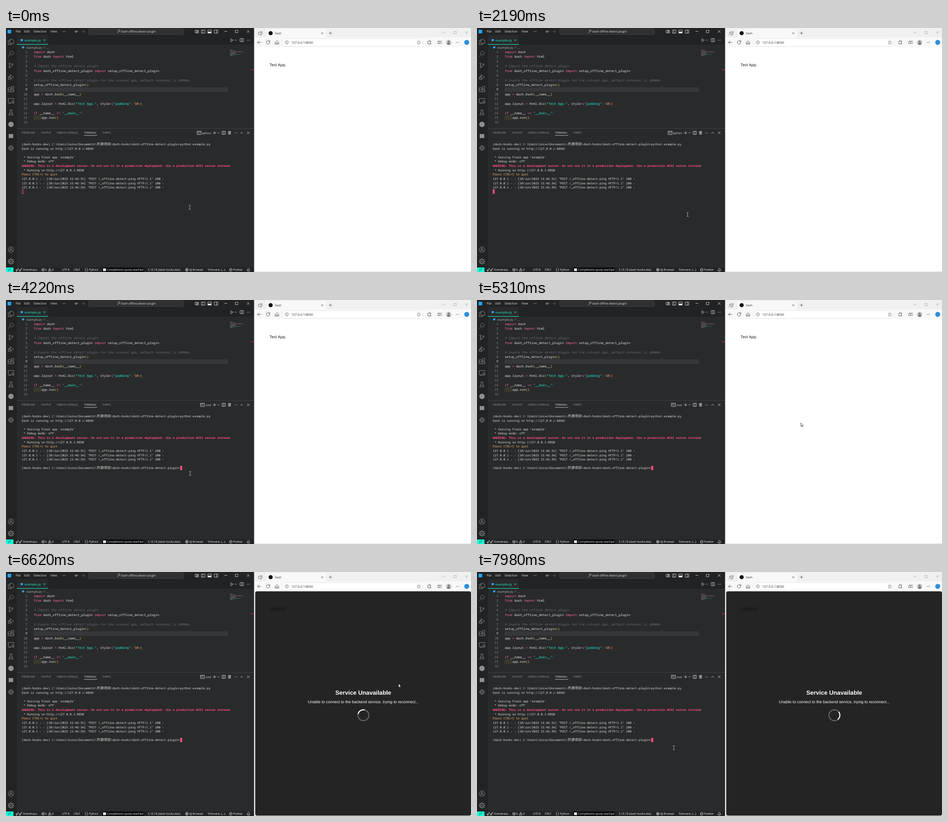
Write an HTML page that moves like this. It is 1030 by 543 pixels and loops after 8 s.

```html
<!DOCTYPE html>
<html lang="en">
<head>
<meta charset="utf-8">
<title>Offline detect demo</title>
<style>
html, body { margin: 0; width: 100%; height: 100%; overflow: hidden; background: #292a2b; }
svg { display: block; width: 1030px; height: 543px; }
text { white-space: pre; text-rendering: geometricPrecision; font-family: "Open Sans", "Noto Sans", sans-serif; }
.mono { font-family: "Noto Sans Mono", "Noto Sans CJK SC", "Noto Sans CJK", monospace; font-weight: 500; }
.mono.bold { font-weight: 700; }
.arial { font-family: "Liberation Sans", Arial, sans-serif; }
</style>
</head>
<body>
<svg id="stage" viewBox="0 0 1030 543" xmlns="http://www.w3.org/2000/svg"></svg>
<script>
const NS = 'http://www.w3.org/2000/svg';
const stage = document.getElementById('stage');
const LIGHT = '#e6e6e6', DIM = '#8d8f92', PINK = '#ff4b82', CYAN = '#19f9d8', BLUE = '#2f9be0';
const INK = '#333';

function el(tag, attrs, parent = stage, text) {
  const n = document.createElementNS(NS, tag);
  for (const k in attrs) n.setAttribute(k, attrs[k]);
  if (text !== undefined) n.textContent = text;
  return parent.appendChild(n);
}
const group = (parent = stage) => el('g', {}, parent);
const rect = (x, y, width, height, fill, more = {}, parent = stage) =>
  el('rect', { x, y, width, height, fill, ...more }, parent);
const dot = (cx, cy, r, fill, parent = stage) => el('circle', { cx, cy, r, fill }, parent);
const label = (x, y, str, size, fill = LIGHT, more = {}, parent = stage) =>
  el('text', { x, y, 'font-size': size, fill, ...more }, parent, str);
const icon = (d, x, y, stroke = LIGHT, width = 0.8, parent = stage) =>
  el('path', { d, transform: `translate(${x} ${y})`, fill: 'none', stroke,
    'stroke-width': width, 'stroke-linejoin': 'round', 'stroke-linecap': 'round' }, parent);
const ring = r => `M${-r} 0a${r} ${r} 0 1 1 ${2 * r} 0a${r} ${r} 0 1 1 ${-2 * r} 0`;
const box = (w, h) => `M${-w / 2} ${-h / 2}h${w}v${h}h${-w}z`;
const cross = r => `M${-r} ${-r}L${r} ${r}M${r} ${-r}L${-r} ${r}`;
const dots = (x, y, fill) => [-2.7, 0, 2.7].forEach(d => dot(x + d, y, 0.65, fill));
const globe = r => ring(r) + `M${-r} 0H${r}M0 ${-r}Q${r} 0 0 ${r}Q${-r} 0 0 ${-r}`;
const CHEVRON = 'M-1.8-.8L0 1L1.8-.8';
const SEARCH = 'M-1-1.6a2.1 2.1 0 1 1 0 .01M-.6 1L-3 3.2';

function drawTitleBar() {
  rect(0, 0, 549, 16, '#222324');
  rect(3.5, 4, 8, 8, '#22a7f2');
  [[21.5, 'File'], [40.5, 'Edit'], [61, 'Selection'], [98.5, 'View']]
    .forEach(([x, s]) => label(x, 10.4, s, 6.8));
  dots(128.5, 8, LIGHT);
  icon('M3.3 0H-3.3M-.6-2.8L-3.4 0L-.6 2.8', 156.5, 8);
  icon('M-3.3 0H3.3M.6-2.8L3.4 0L.6 2.8', 171, 8, '#777');
  rect(183, 1.5, 210, 13, '#2f3031', { rx: 3, stroke: '#505152', 'stroke-width': 0.6 });
  icon(SEARCH, 249.5, 7.6);
  label(255, 10.4, 'dash-offline-detect-plugin', 6.42);
  icon('M-3.5-3h3v6h-3zM1-3h2.5v2.2H1zM1 .8h2.5V3H1z', 423, 8);
  icon(box(7.4, 7) + 'M-1-3.5v7', 437, 8);
  icon(box(7.4, 7), 451, 8);
  rect(447.3, 8, 7.4, 3.5, LIGHT);
  icon(box(7.4, 7) + 'M1-3.5v7', 465.5, 8);
  icon('M-2.8 0H2.8', 487, 7.6);
  icon(box(5.4, 5.4), 511, 7.8);
  icon(cross(2.6), 536.5, 7.8);
}

function drawActivityBar() {
  rect(0, 16, 24, 517, '#222324');
  [
    ['M-2-6h5l3 3v6.5h-8zM-2-3h-4v9h7.5V3.5', 31],
    ['M-2.6-1.4a4 4 0 1 1 0 .01M-1.5 1.8L-6 6.3', 57],
    ['M-1.3-3.6a1.7 1.7 0 1 1-3.4 0a1.7 1.7 0 1 1 3.4 0M-3-1.9v4.4M-1.3 4.2a1.7 1.7 0 1 1-3.4 0a1.7 1.7 0 1 1 3.4 0M5-2a1.7 1.7 0 1 1-3.4 0A1.7 1.7 0 1 1 5-2M3.3-.2Q3 2-1.3 3', 83],
    ['M-2-5.5L6 0L-1 4.5M-2-5.5v4M-5-.5h4v4a2 2 0 0 1-4 0zM-6.3 1h1.3M-6.3 4h1.4M-1 1h1.2M-1 4h1.2M-4.4-.6a1.4 1.6 0 0 1 2.8 0', 109.5],
    ['M-6-3H0V6H-6zM-6 1.5H6V6H0M6 1.5V6M1.8-6H6.3v4.5H1.8z', 136],
    ['M0 4.5h-6v-9.5H6v4M-4 6h4M1.5 3a2.8 2.8 0 1 1 5.6 0a2.8 2.8 0 1 1-5.6 0M3 3h2.6', 162],
    ['M-2.5-5.5h5M-1.5-5.5v4L-5 5.5H5L1.5-1.5v-4M-3.2 2h6.4', 188],
    [globe(5.2), 267],
    [ring(6.2) + 'M-2.2-1.5a2.2 2.2 0 1 1 4.4 0a2.2 2.2 0 1 1-4.4 0M-4 4.5q0-3 4-3t4 3', 493],
    [ring(2) + ring(4.6), 519.5]
  ].forEach(([d, y]) => icon(d, 11, y, DIM, 0.9));
  for (let a = 0; a < 360; a += 45)
    icon('M0-4.8v-1.3', 0, 0, DIM, 1.8).setAttribute('transform', `translate(11 519.5) rotate(${a})`);
  dot(11, 214.5, 6, DIM);
  rect(6, 236, 10, 9, DIM);
}

const CODE = [
  ['pimport', 'w dash'],
  ['pfrom', 'w dash ', 'pimport', 'w html'],
  [],
  ['c# Import the offline detect plugin'],
  ['pfrom', 'w dash_offline_detect_plugin ', 'pimport', 'w setup_offline_detect_plugin'],
  [],
  ['c# Enable the offline detect plugin for the current app, default interval is 5000ms'],
  ['wsetup_offline_detect_plugin', 'y()'],
  [],
  ['wapp ', 'p=', 'w dash.Dash', 'y(', 'w__name__', 'y)'],
  [],
  ['wapp.layout ', 'p=', 'w html.Div', 'y(', 's"Test App."', 'w, style', 'p=', 'o{', 's"padding"', 'w: ', 'n50', 'o}', 'y)'],
  [],
  ['pif', 'w __name__ ', 'p==', 's "__main__"', 'w:'],
  ['w    app.run', 'y()'],
  []
];
const PAINT = { p: '#ff6aa8', w: LIGHT, c: '#676b79', s: CYAN, y: '#ffd750', o: '#da70d6', n: '#ffb86c' };

function drawEditor() {
  rect(24, 16, 525, 21, '#222324');
  rect(24, 16, 69, 21, '#292a2b');
  rect(24, 36, 69, 1, CYAN);
  dot(35, 27, 2.8, BLUE);
  label(41, 29.7, 'example.py', 6.75, CYAN);
  icon(cross(1.9), 85, 27.2, CYAN);
  icon('M-2-3L3 0L-2 3z', 500.5, 27.2);
  icon(CHEVRON, 509.5, 27.2, LIGHT, 0.7);
  icon(box(7, 6.8) + 'M0-3.4v6.8', 522.5, 27);
  dots(537, 27.2, LIGHT);
  dot(38, 43, 2.6, BLUE);
  label(45, 45.6, 'example.py', 6.55, '#b9babb');
  icon('M-1-2L1 0L-1 2', 85.2, 43.2, '#b9babb', 0.7);
  label(89.5, 45.6, '...', 6.55, '#b9babb');
  rect(61, 132, 431, 10.3, '#36373a');
  rect(61, 194.5, 16.8, 10.3, '#3a392e');
  CODE.forEach((parts, i) => {
    const y = 56 + 10.43 * i;
    label(47.2, y, i + 1, 7.03, i === 8 ? LIGHT : DIM, { class: 'mono', 'text-anchor': 'end' });
    const line = label(61.4, y, undefined, 7.03, LIGHT, { class: 'mono', 'xml:space': 'preserve' });
    let col = 0;
    for (const part of parts) {
      const key = part[0], str = part.slice(1);
      el('tspan', { fill: PAINT[key], 'font-style': key === 'c' ? 'italic' : 'normal' }, line, str);
      const lead = str.length - str.trimStart().length;
      rect(496 + (col + lead) * 0.44, 48.6 + i * 0.9, str.trim().length * 0.44, 0.6, PAINT[key], { opacity: 0.55 });
      col += str.length;
    }
  });
  rect(542, 92.3, 7, 1.2, '#c22f66');
}

const PATH = ['(dash-hooks-dev) C:\\Users\\lorvu\\Documents\\', '开源项目', '\\dash-hooks\\dash-offline-detect-plugin>'];
const CELL = 3.945, TERM = 6.575;
const rowY = k => 261 + 9.62 * k;

function termLine(k, str, fill = LIGHT, cls = 'mono') {
  label(35, rowY(k), str, TERM, fill, { class: cls, 'xml:space': 'preserve' });
}
function promptLine(k, cmd, parent) {
  const more = { class: 'mono' }, y = rowY(k);
  label(35, y, PATH[0], TERM, LIGHT, more, parent);
  label(35 + 42 * CELL, y, PATH[1], CELL * 2, LIGHT, more, parent);
  label(35 + 50 * CELL, y, PATH[2] + cmd, TERM, LIGHT, more, parent);
}

function drawPanel() {
  rect(24, 223, 525, 0.8, '#47484a');
  [[35, 'PROBLEMS'], [78, 'OUTPUT'], [113, 'DEBUG CONSOLE'], [173, 'TERMINAL'], [214, 'PORTS']]
    .forEach(([x, s]) => label(x, 235.2, s, 5.7, s === 'TERMINAL' ? LIGHT : '#a0a1a3'));
  rect(173, 238.6, 29, 0.8, LIGHT);
  icon('M-3 0H3M0-3V3', 462, 233.3);
  icon(CHEVRON, 470.5, 233.3, LIGHT, 0.7);
  icon(box(7, 6.8) + 'M0-3.4v6.8', 482.5, 233.3);
  icon('M-3-2.4h6M-1-2.4v-1h2v1M-2.3-2.4l.3 5.8h4l.3-5.8M-.7-.8v2.6M.7-.8v2.6', 495.2, 233.3);
  dots(508.7, 233.3, LIGHT);
  icon('M-2.5 1.2L0-1.3L2.5 1.2', 522, 233.3);
  icon(cross(2.3), 536.5, 233.3);

  promptLine(0, 'python example.py');
  termLine(1, 'Dash is running on http://127.0.0.1:8050/');
  termLine(3, " * Serving Flask app 'example'");
  termLine(4, ' * Debug mode: off');
  termLine(5, 'WARNING: This is a development server. Do not use it in a production deployment. Use a production WSGI server instead.', PINK, 'mono bold');
  termLine(6, ' * Running on http://127.0.0.1:8050');
  termLine(7, 'Press CTRL+C to quit', '#ffb86c');
  ['31', '34', '39'].forEach((sec, i) =>
    termLine(8 + i, `127.0.0.1 - - [10/Jun/2025 15:46:${sec}] "POST /_offline-detect-ping HTTP/1.1" 200 -`));
}

function shellTag(x, name) {
  const g = group();
  icon(box(8.6, 7.4) + 'M-4.3-2h8.6M-2.7-.3l1 1l-1 1M-.4 1.8h2.4', x, 233.4, LIGHT, 0.7, g);
  label(x + 6.6, 235.5, name, 5.95, LIGHT, {}, g);
  return g;
}

function drawStatus() {
  rect(0, 533, 549, 10, '#222324');
  rect(0, 533, 16.5, 10, CYAN);
  icon('M-2.5-.8L-.7 .9L-2.5 2.6M2.5-2.6L.7-.9L2.5 .8', 8, 538, '#111', 0.8);
  rect(213, 533, 92.5, 10, '#08090a');
  const rocket = 'M-2.6 2.8l1-2.4Q1-3 3-3Q3-1-.4 1.8zM-1.4 .2l-1.6 .2M-.2 1.6l-.2 1.7';
  icon(rocket, 25, 538);
  icon(rocket, 32.3, 538);
  icon(ring(3) + cross(1.2), 82, 538);
  icon('M0-3L3.2 2.7H-3.2zM0-1v1.6', 97, 538);
  icon('M-1-3q-1.4 0-1.4 1.5T-3.2 0q.8 0 .8 1.5T-1 3M1-3q1.4 0 1.4 1.5T3.2 0q-.8 0-.8 1.5T1 3', 178, 538);
  rect(215, 535, 6.5, 6, LIGHT);
  icon(globe(3.1), 400.5, 538, LIGHT, 0.7);
  icon(ring(3) + 'M-2.1 2.1L2.1-2.1', 497.7, 538);
  icon('M-3 1.8q1-1 1-2.8a2 2 0 0 1 4 0q0 1.8 1 2.8zM-.7 3h1.4', 537, 538);
  [[38, 'Dolnehaus'], [86.5, '0'], [102, '0'], [124, 'UTF-8'], [150, 'CRLF'], [184, 'Python'],
   [224, 'Completions quota reached'], [314, '3.10.18 (dash-hooks-dev)'], [405.5, 'QJ Browser'],
   [446.5, 'Tolmvere: {...}'], [503, 'Prettier']]
    .forEach(([x, s]) => label(x, 540.4, s, 6.2, '#fff', { 'font-weight': 500 }));
}

const page = (fill, parent) => rect(552, 43, 478, 499, fill, { rx: 4 }, parent);

function drawBrowser() {
  rect(549, 0, 481, 543, '#f0f0f0');
  rect(549, 0, 1, 543, '#7d8288');
  rect(550, 21, 480, 522, '#f8f8f8');
  icon('M-4-1.5L-1-3.8L4-3v5L1 4L-4 3zM-4-1.5L1-.5V4M1-.5L4-3', 563.5, 11.5, '#555', 0.7);
  rect(577, 2.5, 132, 22, '#f8f8f8', { rx: 4 });
  dot(586.2, 11.5, 4.6, '#111');
  label(595.5, 13.7, 'Dash', 6.15, '#222');
  icon(cross(1.9), 700.5, 11.6, INK, 0.7);
  icon('M-3.3 0H3.3M0-3.3V3.3', 718.7, 11.3, INK, 0.7);
  icon('M-2.6 0H2.6', 969.5, 10, '#999', 0.7);
  icon(box(5, 5), 995, 10, '#999', 0.7);
  icon(cross(2.5), 1020, 10, '#999', 0.7);
  icon('M3.8 0H-3.8M-.6-3.2L-3.9 0L-.6 3.2', 561, 32, INK);
  icon('M3.6-1.6A3.9 3.9 0 1 0 3.9 .5M3.9-4v2.6H1.3', 580.5, 32, INK);
  icon('M-3.7-.4L0-4L3.7-.4V4H1.2V1H-1.2V4H-3.7z', 600.3, 32, INK);
  rect(613, 23.7, 310, 16.8, '#fff', { rx: 7, stroke: '#dedede', 'stroke-width': 0.7 });
  icon(ring(3.5) + 'M0-.3v2M0-1.8v.05', 622, 32, '#444', 0.7);
  label(632, 34.5, '127.0.0.1:8050', 7.08, '#222');
  icon('M0-4L1.2-1.4L4-1L2 .9L2.5 3.8L0 2.4L-2.5 3.8L-2 .9L-4-1L-1.2-1.4z', 914.5, 32.2, '#555', 0.7);
  icon('M-3-2.5H-.8a1.3 1.3 0 1 1 2.4 0H3V-.7a1.3 1.3 0 1 0 0 2.3V3.5H-3z', 938, 32, INK);
  icon('M-1.8-3.8L-.8-1.4L1.6-1L-.3 .7L.2 3.2L-1.8 2L-4 3.2L-3.5 .7L-5-1L-2.8-1.4zM1-3H4.5M2.5-.3h2M1.8 2.4h2.7', 960.5, 32, INK, 0.7);
  dot(980.5, 32, 6, '#c9c9c9');
  dot(980.5, 30.3, 2.1, '#777');
  el('path', { d: 'M976.5 35.8q0-3 4-3t4 3q-4 3-8 0z', fill: '#777' });
  dots(1000, 32, INK);
  dot(1020.5, 32, 5.5, '#2f8fdc');
  page('#fff');
  rect(549, 542, 481, 1, '#d6d6d6');
  label(584, 84.9, 'Test App.', 8.55, '#000');
}

function drawOverlay() {
  const g = group();
  page('#242424', g);
  rect(585, 79.5, 35, 6, '#0c0c0c', { opacity: 0.4, style: 'filter:blur(2px)' }, g);
  const more = { class: 'arial', 'text-anchor': 'middle' };
  label(791.4, 272.7, 'Service Unavailable', 13.17, '#fff', { ...more, 'font-weight': 700 }, g);
  label(791.4, 292.3, 'Unable to connect to the backend service, trying to reconnect...', 8.78, '#fff', more, g);
  icon(ring(12.1), 791.7, 318.7, '#666', 2.2, g);
  const arc = icon('M-8.56-8.56A12.1 12.1 0 0 1 8.56-8.56', 0, 0, '#fff', 2.2, g);
  arc.setAttribute('stroke-linecap', 'butt');
  return { g, arc };
}

drawTitleBar();
drawActivityBar();
drawEditor();
drawPanel();
const pythonTag = shellTag(428, 'python');
const cmdTag = shellTag(435.3, 'cmd');
const prompt = group();
promptLine(12, '', prompt);
const caret = rect(35.2, 359.7, 3.6, 9, 'none', { stroke: PINK, 'stroke-width': 0.8 });
drawStatus();
drawBrowser();
const overlay = drawOverlay();

const beam = group();
icon('M-1.8-4.6Q0-4.6 0-3.6Q0-4.6 1.8-4.6M0-3.6V3.6M-1.8 4.6Q0 4.6 0 3.6Q0 4.6 1.8 4.6', 0, 0, '#d0d0d0', 0.8, beam);
const arrow = el('path', { d: 'M0 0V7.8L1.8 6.2L3 8.9L4.3 8.3L3.1 5.7H5.6z',
  fill: '#fff', stroke: '#111', 'stroke-width': 0.7, 'stroke-linejoin': 'round' });

// pointer stops: time, x, y
const STOPS = [
  [0, 407, 399], [180, 330, 424], [420, 163, 370], [560, 240, 309], [700, 330, 318], [810, 400, 350],
  [960, 560, 410], [1160, 760, 330], [1290, 800, 220], [1410, 730, 143], [1520, 705, 180],
  [1630, 764, 247], [1780, 640, 335], [1930, 468, 413], [2090, 468, 413], [2110, 470.5, 415],
  [2190, 466.5, 415], [2920, 466.5, 415], [3240, 400, 420], [3480, 338, 407], [3690, 348, 421],
  [3850, 390, 430], [4000, 456, 398], [4110, 436, 353], [4220, 408, 386], [4590, 408, 386],
  [4850, 510, 350], [5080, 650, 292], [5310, 717.3, 273.5], [5860, 717.3, 273.5], [6280, 835, 296],
  [6620, 869.5, 249], [6710, 881, 237], [6830, 862, 305], [6950, 800, 333], [7090, 730, 290],
  [7230, 750, 238], [7360, 801, 258], [7500, 750, 265], [7700, 580, 330], [7880, 450, 385],
  [7980, 436, 391], [8000, 436, 391]
];
const same = (a, b) => a[1] === b[1] && a[2] === b[2];
function slope(i, c) {
  const a = STOPS[i - 1], p = STOPS[i], b = STOPS[i + 1];
  if (!a || !b || same(a, p) || same(p, b)) return 0;
  return (b[c] - a[c]) / (b[0] - a[0]);
}
function pointer(t) {
  let i = 0;
  while (i < STOPS.length - 2 && STOPS[i + 1][0] <= t) i++;
  const a = STOPS[i], b = STOPS[i + 1], d = b[0] - a[0], u = (t - a[0]) / d;
  return [1, 2].map(c =>
    (1 + 2 * u) * (1 - u) ** 2 * a[c] + u * (1 - u) ** 2 * d * slope(i, c) +
    u * u * (3 - 2 * u) * b[c] + u * u * (u - 1) * d * slope(i + 1, c));
}

const LOOP = 8000, FOCUS = 2185, QUIT = 2930, RENAME = 3600, LOST = 5738, SPIN = 5712;
const show = (node, on) => node.setAttribute('visibility', on ? 'visible' : 'hidden');

function draw(t) {
  const [x, y] = pointer(t);
  const overText = x < 547 && (y > 245 || (y > 48 && y < 222));
  show(beam, overText);
  show(arrow, !overText);
  (overText ? beam : arrow).setAttribute('transform', `translate(${x.toFixed(2)} ${y.toFixed(2)})`);
  show(prompt, t >= QUIT);
  caret.setAttribute('fill', t >= FOCUS ? PINK : 'none');
  caret.setAttribute('transform', t >= QUIT ? `translate(${89 * CELL} 9.6)` : '');
  show(pythonTag, t < RENAME);
  show(cmdTag, t >= RENAME);
  show(overlay.g, t >= LOST);
  overlay.arc.setAttribute('transform', `translate(791.7 318.7) rotate(${(t - SPIN) * 0.36})`);
}

const start = performance.now();
function tick() {
  draw((performance.now() - start) % LOOP);
  requestAnimationFrame(tick);
}
tick();
</script>
</body>
</html>
```
